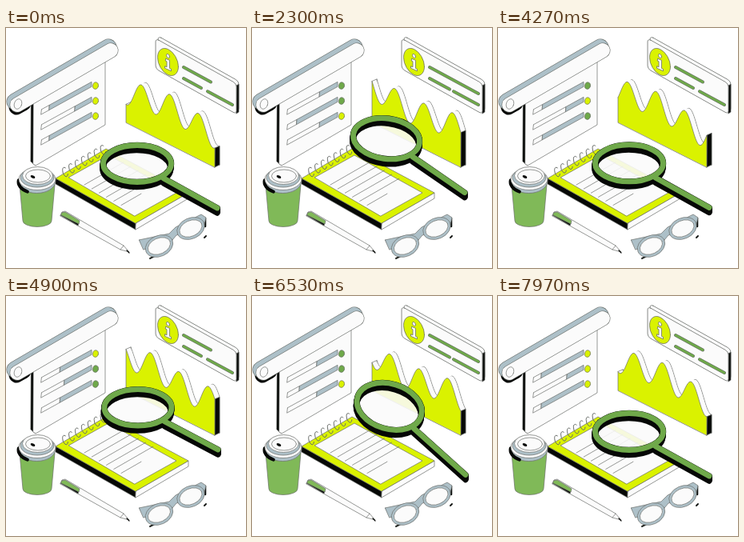
These frames come from a looping animation (300 by 300 pixels, 8010 ms). An HTML page with a canvas:

```html
<!DOCTYPE html>
<html lang="en">
<head>
<meta charset="utf-8">
<title>Research desk</title>
<style>
html, body { margin: 0; width: 100%; height: 100%; overflow: hidden; background: #fff; }
canvas { display: block; width: 100vw; height: 100vh; }
</style>
</head>
<body>
<canvas id="stage"></canvas>
<script>
const canvas = document.getElementById('stage');
const ctx = canvas.getContext('2d');
const LOOP = 4005, TAU = Math.PI * 2;
const INK = '#060806', EDGE = '#6a6e6a', LIME = '#daf200', GREEN = '#6fa94a', CUP = '#80b958';
const GRAY = '#adc0c8', PAPER = '#fbfbfb';

// ---- helpers ----
function paint(fill, stroke = EDGE, width = 0.7) {
  if (fill) { ctx.fillStyle = fill; ctx.fill(); }
  if (stroke) { ctx.strokeStyle = stroke; ctx.lineWidth = width; ctx.stroke(); }
}
function poly(points, fill, stroke, width) {
  ctx.beginPath();
  points.forEach(([x, y]) => ctx.lineTo(x, y));
  ctx.closePath();
  paint(fill, stroke, width);
}
function ellipse(x, y, rx, ry, rot, fill, stroke, width) {
  ctx.beginPath();
  ctx.ellipse(x, y, rx, ry, rot, 0, TAU);
  paint(fill, stroke, width);
}
function line(x1, y1, x2, y2, color = EDGE, width = 0.7) {
  ctx.beginPath();
  ctx.moveTo(x1, y1);
  ctx.lineTo(x2, y2);
  paint(null, color, width);
}
// outlined bar with round ends
function rod(x1, y1, x2, y2, width, fill, edge = EDGE) {
  line(x1, y1, x2, y2, edge, width + 1);
  line(x1, y1, x2, y2, fill, width - 0.2);
}
function skewed(x, y, slope, draw) {
  ctx.save();
  ctx.transform(1, slope, 0, 1, x, y);
  draw();
  ctx.restore();
}
const mix = (a, b, p) => a + (b - a) * p;
// eased 0..1 between two times
function ramp(t, from, to) {
  const p = Math.min(1, Math.max(0, (t - from) / (to - from)));
  return (1 - Math.cos(Math.PI * p)) / 2;
}

// ---- list on a hanging sheet ----
const litSpans = [[700, 1300], [0, 650], [1900, 2700]];
function sheet(t) {
  poly([[31, 92], [37, 90], [37, 172], [31, 167]], INK);
  poly([[34, 88], [124, 38], [124, 121], [37, 172], [34, 170]], PAPER);
  const swing = 16 * Math.cos(t / LOOP * TAU);
  litSpans.forEach(([from, to], i) => {
    const at = x => 105 + i * 19 - (x - 44) * 0.55;
    const bar = (a, b, fill) => poly([[a, at(a) - 3], [b, at(b) - 3], [b, at(b) + 3], [a, at(a) + 3]], fill);
    const cut = 70 + (i === 1 ? swing : -swing);
    bar(44, cut, PAPER);
    bar(cut, 107, GRAY);
    const lit = t < 130 || t > 3500 || (t > from && t < to);
    ellipse(112, at(112) + 4.5, 3.5, 4.3, 0.25, lit ? LIME : GREEN);
  });
  ctx.lineCap = 'round';
  line(13, 99, 22, 94, INK, 19);
  rod(11, 92, 128, 24, 20, GRAY);
  rod(14, 96, 131, 28, 18, PAPER);
  ellipse(15, 95, 4.6, 6.5, 0.35, PAPER);
}

// ---- travelling wave ----
function wave(t) {
  const k = TAU / 36, shift = t / LOOP * 108;
  const top = x => {
    const u = k * (x + 3 + shift - 208);
    return 72.5 - 16 * Math.cos(u) - 4 * Math.cos(u / 3) + 1.5 + (x - 147) / 2;
  };
  const face = depth => {
    const dx = 6 * depth, dy = -2.6 * depth;
    ctx.beginPath();
    ctx.moveTo(150 + dx, 118 + dy);
    for (let x = 150; x <= 261; x++) ctx.lineTo(x + dx, top(x) + dy);
    ctx.lineTo(261 + dx, 174 + dy);
    ctx.closePath();
  };
  ctx.lineJoin = 'round';
  face(1);
  paint(PAPER);
  for (let d = 0.9; d > 0; d -= 0.1) { face(d); paint(PAPER, null); }
  line(150, top(150), 156, top(150) - 2.6);
  const end = top(261);
  poly([[261, end], [267, end - 2.6], [267, 171], [261, 174]], INK);
  face(0);
  paint(LIME);
}

// ---- notice card ----
function card(t) {
  const plate = (dx, dy, fill) => skewed(187 + dx, 13 + dy, 0.56, () => {
    ctx.beginPath();
    ctx.roundRect(0, 0, 101, 38, 4);
    paint(fill);
  });
  plate(3, -3, PAPER);
  poly([[288, 72], [291, 70], [291, 105], [288, 107]], INK);
  plate(0, 0, PAPER);
  skewed(202.5, 42.5, 0.45, () => {
    ellipse(0, 0, 13, 16, 0, LIME);
    ellipse(0, -7.5, 2, 2.4, 0, PAPER);
    poly([[-3, -3], [2, -3], [2, 7], [4, 7], [4, 9.5], [-4, 9.5], [-4, 7], [-1.5, 7], [-1.5, 0], [-3, 0]], PAPER);
  });
  const grow = ramp(t, 1600, 2300) - ramp(t, 2900, 3900);
  const gap = ramp(t, 1000, 1500) - ramp(t, 1600, 2200);
  const rule = (x1, x2, y) => {
    const at = x => y + (x - 220) * 0.54;
    rod(x1, at(x1), x2, at(x2), 3, GREEN);
  };
  rule(222, 256 + 27 * grow, 48);
  rule(222, 244 + 3 * grow, 62);
  rule(252 + 9 * gap, 283, 62);
}

// ---- desk objects ----
function cup() {
  ctx.beginPath();
  ctx.moveTo(17, 196);
  ctx.lineTo(21, 241);
  ctx.ellipse(39, 241, 18, 7.5, 0, Math.PI, 0, true);
  ctx.lineTo(61, 196);
  ctx.closePath();
  paint(CUP);
  ellipse(38.5, 192.5, 23, 14, 0, GRAY);
  ctx.beginPath();
  ctx.ellipse(38.5, 192.5, 23, 14, 0, 2.1, 3.3);
  paint(null, INK, 4);
  ellipse(39, 189, 23, 13.5, 0, PAPER);
  ellipse(39, 187, 21, 12, 0, GRAY);
  ellipse(39.5, 184.5, 19, 11, 0, PAPER);
  ellipse(40, 185, 15.5, 8, 0, PAPER);
  ellipse(33.5, 186, 3, 1.7, 0.4, INK, null);
}
function notebook() {
  poly([[62, 188], [162, 244], [162, 252], [62, 195]], INK);
  poly([[162, 244], [228, 206], [228, 213], [162, 252]], PAPER);
  poly([[62, 188], [125, 151], [228, 206], [162, 244]], LIME);
  poly([[78, 187], [128, 159], [213, 206], [161, 235]], PAPER);
  for (let i = 0; i < 6; i++) {
    const x = 98 + i * 9.2, y = 196 + i * 5.1, len = i === 5 ? 25 : 49;
    line(x, y, x + len, y - len * 0.575);
  }
  for (let i = 0; i < 7; i++) {
    const x = 74 + i * 7.9, y = 180 - i * 4.6;
    ctx.beginPath();
    ctx.ellipse(x, y, 3, 6, -0.3, 0.6, 5.4);
    paint(null, EDGE, 1);
  }
}
function pen() {
  poly([[70, 230], [74, 229], [147, 272], [154, 280], [143, 277], [68, 235]], PAPER);
  poly([[68, 234], [90, 247], [91, 244], [73, 233]], INK);
  poly([[69, 231], [74, 230], [92, 241], [91, 245], [69, 234]], CUP);
  line(147, 272, 143, 277);
  line(151, 278, 154, 281, INK, 1.2);
}
function glasses() {
  rod(180, 288, 186, 285, 1.4, INK);
  rod(248, 262, 250, 260, 1.4, INK);
  line(249, 238, 249, 248, INK, 2.5);
  poly([[166, 265], [204, 257], [212, 249], [244, 233], [250, 237], [248, 246],
    [230, 254], [213, 259], [208, 265], [172, 277]], GRAY);
  [[191.5, 272.5], [231, 250.5]].forEach(([x, y]) => {
    ellipse(x, y, 18, 13, -0.42, GRAY);
    ellipse(x, y, 14.8, 9.8, -0.42, PAPER);
  });
}

// ---- magnifier: centre, radii, tilt, handle end ----
const down = [164, 169.5, 42.5, 23, 0, 264, 225];
const up = [165, 138.5, 42, 22.7, 0, 265, 191];
const tipped = [172, 138, 41.5, 28.5, 0.3, 267, 225];
function magnifier(t) {
  const lift = ramp(t, 200, 980), tip = ramp(t, 2050, 2600), back = ramp(t, 3100, 3900);
  const [cx, cy, rx, ry, tilt, hx, hy] = down.map((v, i) =>
    mix(mix(mix(v, up[i], lift), tipped[i], tip), v, back));
  const dir = Math.atan2(hy - cy, hx - cx) - tilt;
  const reach = rx * ry / Math.hypot(ry * Math.cos(dir), rx * Math.sin(dir)) + 4;
  const sx = cx + reach * Math.cos(dir + tilt), sy = cy + reach * Math.sin(dir + tilt);
  const ring = (drop, color, w) => ellipse(cx - drop * 0.12, cy + drop, rx, ry, tilt, null, color, w);
  ellipse(cx, cy + 3, rx, ry, tilt, 'rgba(251,251,251,.88)', null);
  ctx.lineCap = 'round';
  for (let drop = 6; drop >= 0; drop--) {
    ring(drop, INK, 7.4);
    line(sx, sy + drop, hx, hy + drop, INK, 7.4);
  }
  line(sx, sy, hx, hy, GREEN, 6.8);
  ring(0, GREEN, 6.8);
}

function draw(now) {
  const dpr = devicePixelRatio || 1;
  const w = Math.round(innerWidth * dpr), h = Math.round(innerHeight * dpr);
  if (canvas.width !== w || canvas.height !== h) {
    canvas.width = w;
    canvas.height = h;
  }
  ctx.setTransform(w / 300, 0, 0, h / 300, 0, 0);
  ctx.fillStyle = '#fff';
  ctx.fillRect(0, 0, 300, 300);
  const t = Math.max(0, now - start) % LOOP;
  sheet(t);
  wave(t);
  card(t);
  notebook();
  cup();
  pen();
  glasses();
  magnifier(t);
  requestAnimationFrame(draw);
}
const start = performance.now();
draw(start);
</script>
</body>
</html>
```
